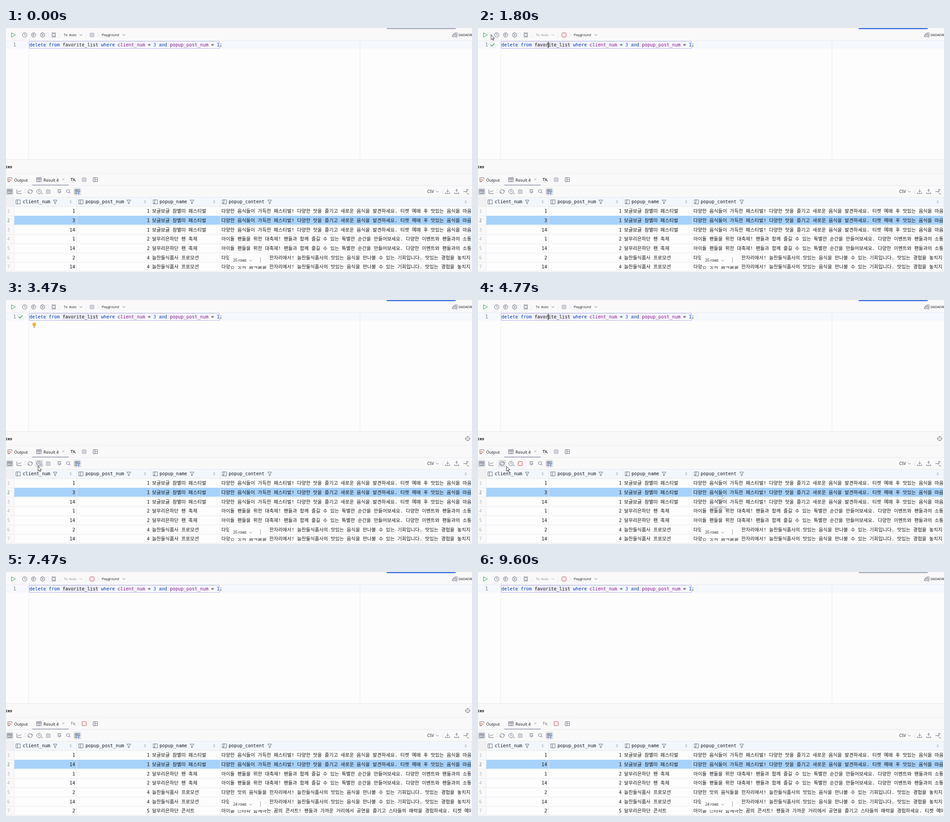
An HTML page for the animation above (9.63 s loop, 1032 by 543 pixels).

```html
<!DOCTYPE html>
<html lang="ko">
<head>
<meta charset="utf-8">
<title>Query console</title>
<style>
html, body { margin: 0; width: 100%; height: 100%; overflow: hidden; background: #fdfdfd; }
svg { display: block; }
text { white-space: pre; fill: #15161a; font-family: "Open Sans", "Noto Sans", sans-serif; }
.mono { font: 10.14px "DejaVu Sans Mono", monospace; }
.ko { font: 10.63px "DejaVu Sans Mono", "Noto Sans CJK KR", "Noto Sans CJK JP", "Noto Sans CJK", monospace; word-spacing: -.3px; }
.kw { fill: #0033b3; } .num { fill: #1750eb; } .col { fill: #871094; }
.icon { fill: none; stroke: #6c707e; stroke-linecap: round; stroke-linejoin: round; }
</style>
</head>
<body>
<svg id="stage" width="1032" height="543" viewBox="0 0 1032 543"></svg>
<script>
const LOOP = 9630;
const stage = document.getElementById('stage');
const PANEL = '#f9f9fa', LINE = '#e9eaf2', GRAY = '#6c707e', FAINT = '#b4b7c2';

const rect = (x, y, w, h, fill, more = '') =>
  `<rect x="${x}" y="${y}" width="${w}" height="${h}" fill="${fill}" ${more}/>`;
const text = (x, y, s, size, more = '') =>
  `<text x="${x}" y="${y}" font-size="${size}" ${more}>${s}</text>`;
const mono = (x, y, s, more = '') => `<text class="mono" x="${x}" y="${y}" ${more}>${s}</text>`;
const icon = (x, y, d, more = '') =>
  `<path class="icon" transform="translate(${x} ${y})" d="${d}" ${more}/>`;
const group = (id, body) => `<g id="${id}">${body}</g>`;
const hline = (y, x = 0, w = 1032) => rect(x, y, w, 1, LINE);
const vline = (x, y, h) => rect(x, y, 1, h, LINE);
const stop = (id, x, y) => rect(x - 4.5, y - 4.5, 9, 9, '#d0d2d9', `id="${id}" rx="1" stroke="${FAINT}"`);

const ring = r => `M${-r} 0a${r} ${r} 0 1 0 ${2 * r} 0a${r} ${r} 0 1 0 ${-2 * r} 0`;
const CHEVRON = 'M-2.5 -1.2L0 1.3 2.5 -1.2';
const CLOCK = ring(5) + 'M0 -3V.3L2 1.5';
const TABLE = 'M-5 -4.5H5V4.5H-5ZM-5 -1.5H5M-1.7 -4.5V4.5M1.7 -4.5V4.5';
const FUNNEL = 'M-4.2 -4H4.2L1.2 0V3.2L-1.2 4.2V0Z';
const COLUMN = 'M-4.5 -4.5H4.5V4.5H-4.5ZM-1.5 -4.5V4.5';
const SORT = 'M-1.3 -1.2L0 -2.6 1.3 -1.2M-1.3 1.2L0 2.6 1.3 1.2';
const TRAY = 'M-4.5 2V4.5H4.5V2';

const EVENTS = {
  food: ['보글보글 참별미 페스티벌', '다양한 음식들이 가득한 페스티벌! 다양한 맛을 즐기고 새로운 음식을 발견하세요. 티켓 예매 후 맛있는 음식을 마음'],
  fans: ['달무리은하단 팬 축제', '아이돌 팬들을 위한 대축제! 팬들과 함께 즐길 수 있는 특별한 순간을 만들어보세요. 다양한 이벤트와 팬들과의 소통'],
  promo: ['늘찬들식품사 프로모션', '다양한 맛의 음식들을 한자리에서! 늘찬들식품사의 맛있는 음식을 만나볼 수 있는 기회입니다. 맛있는 경험을 놓치지'],
  show: ['달무리은하단 콘서트', '아이돌 스타와 함께하는 꿈의 콘서트! 팬들과 가까운 거리에서 공연을 즐기고 스타들의 매력을 경험하세요. 티켓 예매']
};
const ROWS = [
  [1, 1, 'food'], [3, 1, 'food'], [14, 1, 'food'], [1, 2, 'fans'], [14, 2, 'fans'],
  [2, 4, 'promo'], [14, 4, 'promo'], [2, 5, 'show']
];

const tableRows = rows => rows.slice(0, 7).map(([client, post, key], i) => {
  const y = 411.3 + i * 20.65, [name, content] = EVENTS[key];
  return mono(153, y, client, 'text-anchor="end"') + mono(318, y, post, 'text-anchor="end"') +
    `<text class="ko" x="323.5" y="${y}">${name}</text><text class="ko" x="477" y="${y}">${content}</text>`;
}).join('');

function toolbar() {
  return rect(0, 0, 1032, 28, PANEL) + hline(28) +
    rect(843, 0, 153, 2.5, '#a8adbd', 'id="tab" rx="1"') +
    icon(16.5, 15.5, 'M-4 -4.8L4.5 0 -4 4.8Z', 'style="stroke:#3f9f5a;fill:#f2fcf3"') +
    [28, 93, 118, 176, 203].map(x => vline(x, 10, 11)).join('') +
    icon(41.5, 15.5, CLOCK) +
    icon(61, 15.5, ring(5) + 'M-1.3 2.8V-2.5H.5A1.5 1.5 0 0 1 .5 .6H-1.3') +
    icon(81, 15.5, 'M-1.2 -5H1.2L1.8 -3.4 3.7 -3.6 5 -1.6 3.9 0 5 1.6 3.7 3.6 1.8 3.4 1.2 5H-1.2L-1.8 3.4 -3.7 3.6 -5 1.6 -3.9 0 -5 -1.6 -3.7 -3.6 -1.8 -3.4Z' + ring(1.6)) +
    icon(106, 15.5, 'M-3.5 -2.5H3.5V2.5H-3.5ZM-4.5 -4.5H4.5M-4.5 4.5H4.5') +
    group('txAuto', text(128, 18.2, 'Tx: Auto', 7.4) + icon(166, 15.5, CHEVRON)) +
    stop('runStop', 190.5, 15.5) +
    text(212, 18.2, 'Playground', 7.25) + icon(261, 15.5, CHEVRON) +
    icon(994, 15.5, 'M-5 0H-1.5V4H-5ZM1 -4.5H5V-1H1ZM1.5 1H5V4.5H1.5ZM-3.2 0V-2.5H1') +
    text(1002, 18.2, 'DADADB', 7.4);
}

function editor() {
  const code = '<tspan class="kw">delete from</tspan> favorite_list <tspan class="kw">where</tspan> ' +
    '<tspan class="col">client_num</tspan> = <tspan class="num">3</tspan> <tspan class="kw">and</tspan> ' +
    '<tspan class="col">popup_post_num</tspan> = <tspan class="num">1</tspan>;';
  return rect(0, 29, 1032, 17, '#f5f8fd') + vline(49.5, 29, 263) + vline(783.5, 29, 263) +
    rect(125, 30, 79, 15, '#ecebf8', 'id="mark"') +
    rect(51.5, 29.5, 421, 16, 'none', 'stroke="#b7b5ee"') +
    mono(16, 41, 1, 'style="fill:#6c707e"') + mono(52, 41, code) +
    group('check', icon(32, 37.5, 'M-3.8 .2L-1.2 2.8 4 -2.6', 'style="stroke:#3fa35b;stroke-width:1.6"')) +
    group('bulb', '<circle cx="62.5" cy="54.5" r="4" fill="#f5b22e"/>' +
      rect(60.7, 57, 3.6, 2.2, '#f5b22e') + rect(60.8, 60, 3.4, 1.5, '#8a8d98')) +
    rect(154.8, 31, 1.4, 13, '#000', 'id="caret"');
}

function resultBars() {
  const active = x => rect(x - 8.5, 355.5, 17, 17, '#dfe1e6', 'rx="3"');
  return rect(0, 292, 1032, 105, PANEL) + hline(292) + hline(323) + hline(350) + hline(376) +
    text(-1, 312, 'ces', 9, 'font-weight="700"') +
    group('target', icon(1022.5, 308.5, ring(4.7) + 'M0 -4.7V-2M0 4.7V2M-4.7 0H-2M4.7 0H2')) +
    icon(8.5, 337.5, 'M-1 4.5H-4.5V-4.5H4.5V-1') +
    icon(9.5, 339, 'M-2.5 -2.5L2 0 -2.5 3.5Z', 'style="stroke:#d9603b"') +
    text(18, 341.6, 'Output', 9.1) +
    icon(73, 337.5, TABLE) + text(83, 341.6, 'Result 4', 9.15) +
    icon(127, 337, 'M-2 -2L2 2M2 -2L-2 2', 'style="stroke:#a8adbd"') +
    rect(58, 348.5, 81, 2, '#a8adbd') +
    group('txTab', text(143, 340.3, 'Tx', 9, 'font-weight="600"') + icon(152.5, 340, 'M0 0H2L1 1.2Z')) +
    vline(160, 332, 11) + stop('tabStop', 173, 337.5) +
    icon(198, 337.5, 'M-4.5 -4.5H4.5V4.5H-4.5ZM-1 -4.5V4.5M-1 0H4.5') +
    active(8) + active(158) + group('hoverSync', active(53.5)) + group('hoverClock', active(73.5)) +
    icon(8.5, 364, TABLE) + icon(29, 364, 'M-5 -4.5V4.5H5M-3 1.5L-.5 -1.5 1.5 .5 4.5 -3') +
    vline(41, 358, 11) +
    icon(53.5, 364, 'M-4.7 -.6A4.7 4.7 0 0 1 3.8 -2.5M4.7 .6A4.7 4.7 0 0 1 -3.8 2.5M1.6 -2.2H5.3L4.8 -.2M-1.6 2.2H-5.3L-4.8 .2') +
    icon(73, 364, CLOCK) + icon(79, 369, 'M0 0H1V-1Z') +
    stop('gridStop', 93.5, 364) + vline(105, 358, 11) +
    icon(118, 364, 'M-3 -4.5H3M-2 -4.5V-1L-4 1.2H4L2 -1V-4.5M0 1.2V5') +
    icon(138, 363.5, 'M-4 -.5a3.5 3.5 0 1 0 7 0a3.5 3.5 0 1 0 -7 0M2 2L4.5 4.5') +
    icon(158, 364, 'M0 4.5H-5V-4.5H5V-2M-2 -4.5V4.5M-5 -2H3') +
    icon(160.5, 366, 'M-3 -2.5H3.5L1 .5V3.5L-.5 2.5V.5Z', 'style="stroke:#3574f0"') +
    text(933, 367, 'CSV', 8.3) + icon(955, 364, CHEVRON) + vline(966, 358, 11) +
    icon(978, 364, TRAY + 'M0 -5V1.5M-2.5 -1L0 1.5 2.5 -1') +
    icon(998, 364, TRAY + 'M0 1.5V-5M-2.5 -2.5L0 -5 2.5 -2.5') +
    icon(1019, 364, 'M-6 0H2M0 -2L2 0 0 2M1 -4H5M3 -5.5L1 -4 3 -2.5M2 5H6');
}

function grid() {
  const head = [[27, 37, 'client_num', 109, 143], [166, 176, 'popup_post_num', 272, 308],
    [331, 340, 'popup_name', 412, 461], [484, 493, 'popup_content', 584, 1018]];
  let out = rect(0, 377, 1032, 20, '#f3f7fd') + rect(0, 377, 18, 20, '#f1f1f4') +
    rect(18, 397, 1012, 144, '#fdfdfd') + rect(0, 397, 18, 144, PANEL);
  head.forEach(([ix, tx, name, fx, sx], i) => {
    out += icon(ix, 387, COLUMN) + mono(tx, 390.3, name) + icon(fx, 387, FUNNEL) + icon(sx, 387, SORT);
    if (i > 1) out += rect(ix - 6, 387, 4, 5, '#f3f7fd') + icon(ix - 4, 390, ring(1.4));
  });
  for (let i = 0; i < 7; i++) {
    out += hline(397 + i * 20.65) +
      mono(2.5, 411.3 + i * 20.65, i + 1, `style="fill:${i === 1 ? GRAY : FAINT}"`);
  }
  out += rect(18, 418, 1012, 19.6, '#a6d2fa');
  out += [17.5, 156, 320.5, 474, 1030].map(x => vline(x, 377, 164)).join('');
  out += `<clipPath id="cells"><rect x="0" y="397" width="1030" height="144"/></clipPath><g clip-path="url(#cells)">` +
    group('before', tableRows(ROWS)) +
    group('after', tableRows(ROWS.filter(row => row !== ROWS[1]))) + '</g>';
  const spokes = Array.from({ length: 8 }, (_, i) =>
    `<path d="M0 -5V-9" transform="rotate(${i * 45})" stroke="#85899a" stroke-width="2.2" stroke-linecap="round" opacity="${.2 + i * .09}"/>`).join('');
  return out + group('query', `<g transform="translate(536 441)"><g id="spinner">${spokes}</g></g>` +
      text(513.5, 463.5, 'Querying...', 8.7, 'style="fill:#85899a"')) +
    rect(494, 503.5, 84, 26.5, '#fdfdfd', 'rx="5"') +
    text(503, 520.3, '25 rows', 8.2, 'id="count"') + icon(541.5, 517.5, CHEVRON) +
    [512.5, 516.5, 520.5].map(y => `<circle cx="563.5" cy="${y}" r=".9" fill="${GRAY}"/>`).join('') +
    rect(0, 541, 1032, 2, PANEL) + hline(540.5);
}

stage.innerHTML = toolbar() + editor() + resultBars() + grid() +
  group('mouse', '<path d="M0 0V11L2.5 8.7 4.2 12.4 5.8 11.7 4.2 8.1H7.6Z" fill="#fff" stroke="#222" stroke-width=".9"/>');

const $ = Object.fromEntries([...stage.querySelectorAll('[id]')].map(el => [el.id, el]));
const show = (id, on) => { $[id].style.visibility = on ? 'visible' : 'hidden'; };
const dim = (id, on) => { $[id].style.opacity = on ? .5 : 1; };
const setStop = (id, on) => {
  $[id].setAttribute('fill', on ? '#fff5f5' : '#d0d2d9');
  $[id].setAttribute('stroke', on ? '#db3b4b' : FAINT);
};

// Time, x, y
const PATH = [[250, 330, 150], [650, 155, 38], [850, 155, 38], [1500, 29, 15], [2050, 29, 15],
  [3150, 71, 370], [3800, 71, 370], [4250, 63, 370], [5100, 63, 370], [5600, 70, 372],
  [6100, 70, 372], [6800, 210, 545]];

function mouseAt(t) {
  const i = PATH.findIndex(p => p[0] > t);
  if (i < 1) return null;
  const [t0, x0, y0] = PATH[i - 1], [t1, x1, y1] = PATH[i];
  const u = (t - t0) / (t1 - t0), k = u * u * (3 - 2 * u);
  return [x0 + (x1 - x0) * k, y0 + (y1 - y0) * k];
}

function draw(t) {
  const within = (a, b) => t >= a && t < b;
  const focused = within(700, 8500), done = t >= 5300;
  const running = within(1600, 2100) || done;
  $.tab.setAttribute('fill', focused ? '#3d6fe0' : '#a8adbd');
  show('mark', t >= 700);
  show('caret', focused && (t - 700) % 1000 < 500);
  show('check', within(1700, 4500));
  show('bulb', within(2700, 4500));
  show('target', within(2700, 8500));
  show('hoverClock', within(3100, 4100));
  show('hoverSync', within(4100, 6250));
  show('query', within(4600, 5300));
  $.spinner.setAttribute('transform', `rotate(${Math.floor(t / 125) * 45})`);
  show('before', !done);
  show('after', done);
  $.count.textContent = done ? '24 rows' : '25 rows';
  dim('txAuto', running);
  dim('txTab', done);
  setStop('runStop', running);
  setStop('tabStop', done);
  setStop('gridStop', within(4500, 5300));
  const pos = mouseAt(t);
  show('mouse', pos);
  if (pos) $.mouse.setAttribute('transform', `translate(${pos})`);
}

const start = performance.now();
(function tick() {
  draw((performance.now() - start) % LOOP);
  requestAnimationFrame(tick);
})();
</script>
</body>
</html>
```
